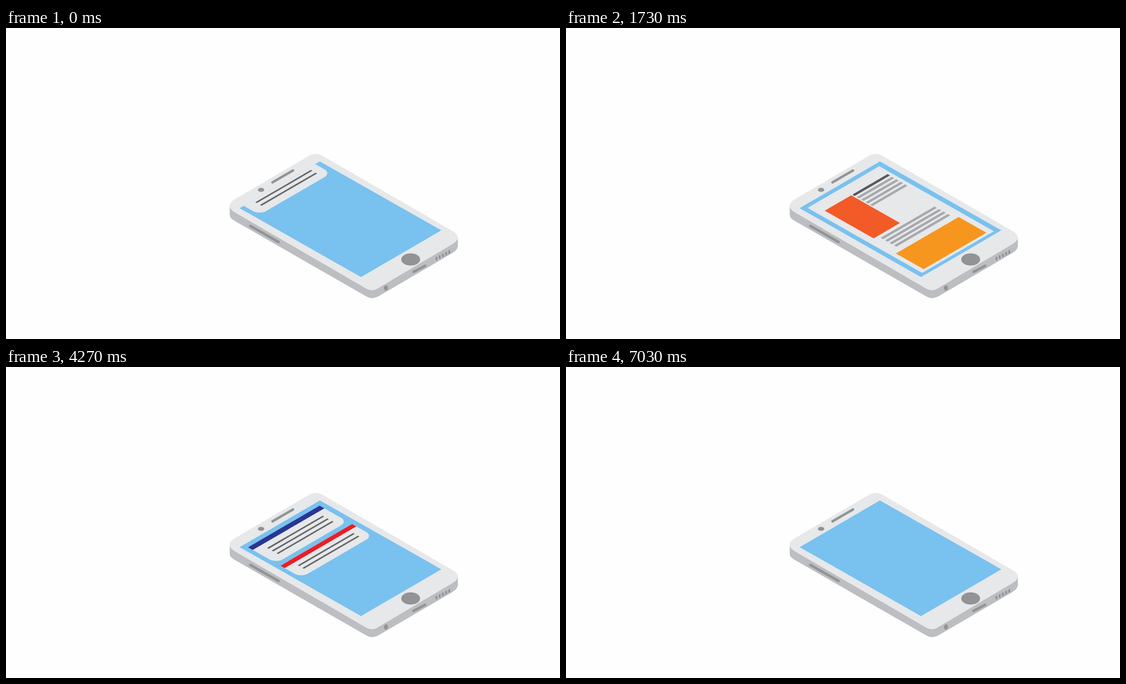
Recreate the animation shown at these times as an HTML page. Size 998 by 561 pixels, loop 7230 ms.

```html
<!DOCTYPE html>
<html lang="en">
<head>
<meta charset="utf-8">
<title>Phone screen</title>
<style>
  html, body { margin: 0; width: 100%; height: 100%; overflow: hidden; background: #fefefe; }
  svg { display: block; width: 100%; height: 100%; }
  .face, .sheet { fill: #e6e8ea; }
  .side { fill: #bcbec2; }
  .part { fill: #929395; }
  .slot { stroke: #929395; stroke-width: 4.4; stroke-linecap: round; }
  .ink { stroke: #636466; stroke-width: 2.7; }
  .copy { stroke: #a7a9ac; stroke-width: 4.4; }
</style>
</head>
<body>
<svg viewBox="0 0 998 561">
  <defs>
    <clipPath id="glass"><rect width="219" height="145"/></clipPath>
  </defs>

  <path class="side" d="M403 320V337Q403 343 412 348L647 483Q659 491 671 484L804 406Q814 400 814 393V380Z"/>
  <path class="face" d="M412 309L545 231Q557 223 571 231L804 366Q824 378 804 390L671 469Q659 477 647 469L413 333Q393 321 412 309Z"/>

  <path class="slot" d="M480 278.5L517 257M440 357L491 386M734 440L755 429"/>
  <g class="part">
    <ellipse cx="459.5" cy="292" rx="5.8" ry="3.7"/>
    <ellipse cx="729" cy="417.5" rx="17" ry="11"/>
    <ellipse cx="684.5" cy="469" rx="3.7" ry="4.7"/>
    <ellipse cx="775.5" cy="416" rx="1.8" ry="3.4"/>
    <ellipse cx="781.3" cy="413" rx="1.8" ry="3.4"/>
    <ellipse cx="787" cy="410" rx="1.8" ry="3.4"/>
    <ellipse cx="792.8" cy="407" rx="1.8" ry="3.4"/>
    <ellipse cx="798.5" cy="404" rx="1.8" ry="3.4"/>
  </g>

  <!-- Screen plane: x runs down the phone, y runs across it -->
  <g transform="matrix(1 .568 1 -.582 420.5 325)">
    <g clip-path="url(#glass)">
      <rect width="219" height="145" fill="#79c1ef"/>

      <g id="redCard">
        <path class="sheet" d="M0 0H25.5a12 12 0 0 1 12 12V117a12 12 0 0 1-12 12H0Z"/>
        <rect width="7.5" height="129" fill="#ed1c24"/>
        <path class="ink" d="M16.4 16v100M24.8 16v100"/>
      </g>

      <g id="blueCard">
        <path class="sheet" d="M0 0H38.5a12 12 0 0 1 12 12V117a12 12 0 0 1-12 12H0Z"/>
        <rect width="8.5" height="129" fill="#283693"/>
        <path class="ink" d="M19.8 16v100M28.2 16v100M36.7 16v100"/>
      </g>

      <g id="article">
        <rect class="sheet" x="7" y="6.8" width="206.5" height="129.2"/>
        <rect x="27" y="67.5" width="4.2" height="63.5" fill="#58595b"/>
        <path class="copy" d="M37.1 67.5v63M45.1 67.5v63M53.1 67.5v63M61.1 67.5v63"/>
        <rect x="27" y="17.8" width="88" height="47.5" fill="#f25a28"/>
        <path class="copy" d="M122.7 25v97M130.7 25v97M138.7 25v97M146.7 25v97"/>
        <rect x="159" y="14" width="50" height="113" fill="#f7961e"/>
      </g>
    </g>
  </g>
</svg>

<script>
  const LOOP = 7230, STEP = 100 / 3, CYCLE_STEPS = 110;
  const [blueCard, redCard, article] =
    ['blueCard', 'redCard', 'article'].map(id => document.getElementById(id));

  const place = (el, x, y) => el.setAttribute('transform', `translate(${x} ${y})`);

  // Distance still to travel on a sharp ease-out
  function remaining(t, start, duration, distance) {
    const p = Math.min(1, Math.max(0, (t - start) / duration));
    return distance * (1 - Math.sqrt(p)) ** 2.5;
  }

  // Accelerating slide off the left edge
  function slideOut(t, start) {
    const s = Math.max(0, t - start);
    return Math.min(160, 0.18 * s + 0.0006 * s * s);
  }

  function articleShift(t) {
    if (t < 1290) return 160;
    const arriving = 109 * (Math.max(0, 1840 - t) / 540) ** 3;
    return arriving - slideOut(t, 3000);
  }

  function draw(now) {
    const step = Math.floor((now % LOOP + 3.4) / STEP);
    const t = step % CYCLE_STEPS * STEP;
    place(blueCard, 8 - remaining(t, -30, 530, 58.5), 7.5 - slideOut(t, 918));
    place(redCard, 66.5 - remaining(t, 45, 560, 104), 7.5 - slideOut(t, 978));
    place(article, 0, articleShift(t));
  }

  let origin;
  function tick(now) {
    origin ??= now;
    draw(now - origin);
    requestAnimationFrame(tick);
  }
  draw(0);
  requestAnimationFrame(tick);
</script>
</body>
</html>
```
